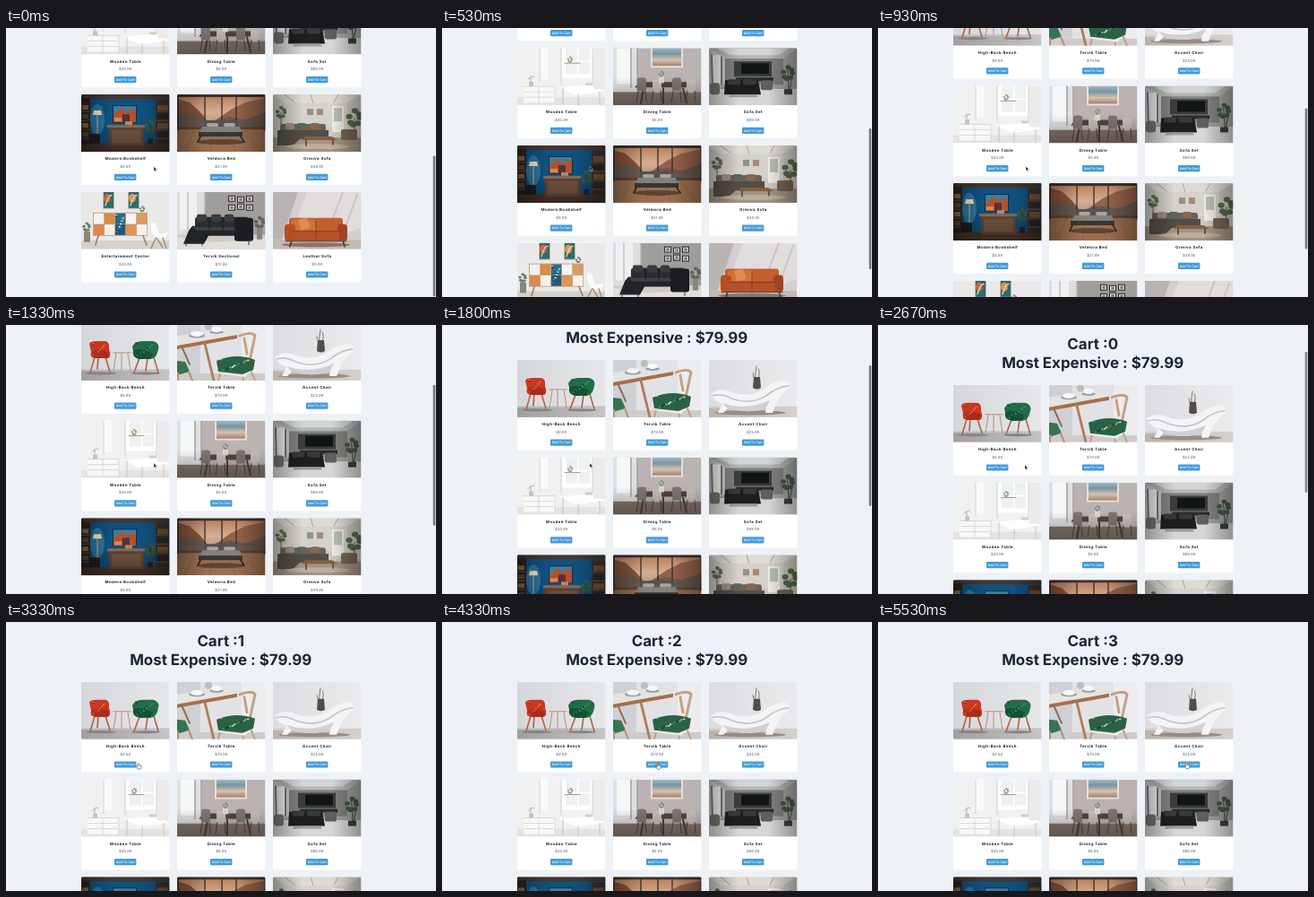
Recreate the animation shown at these times as an HTML page. Size 480x300 px, loop 5590 ms.

```html
<!DOCTYPE html>
<html lang="en">
<head>
<meta charset="utf-8">
<title>Furniture shop</title>
<style>
  html, body { margin: 0; width: 100%; height: 100%; overflow: hidden; background: #eef2f7; }
  svg { display: block; }
  text { font-family: Inter, "Noto Sans", sans-serif; text-anchor: middle; text-rendering: geometricPrecision; }
  .head { font-size: 16.9px; font-weight: 700; fill: #1a2533; }
  .name { font-size: 4.35px; font-weight: 700; letter-spacing: .42px; fill: #1a2533; }
  .price { font-size: 4.3px; fill: #5d6b7f; }
  .add { font-size: 3.7px; font-weight: 500; fill: #fff; }
</style>
</head>
<body>
<svg id="stage" width="100%" height="100%" viewBox="0 0 480 300"></svg>
<script>
const LOOP = 5590, PITCH_X = 107, PITCH_Y = 108.7;

// Shape helpers, all returning SVG markup
const r = (x, y, w, h, c, rx = 0) => `<rect x="${x}" y="${y}" width="${w}" height="${h}" rx="${rx}" fill="${c}"/>`;
const o = (x, y, rx, ry, c) => `<ellipse cx="${x}" cy="${y}" rx="${rx}" ry="${ry}" fill="${c}"/>`;
const p = (d, c) => `<path d="${d}" fill="${c}"/>`;
const l = (d, c, w = 1) => `<path d="${d}" fill="none" stroke="${c}" stroke-width="${w}" stroke-linecap="round"/>`;
const room = (wall, floor, y) => r(0, 0, 99, y, wall) + r(0, y, 99, 64 - y, floor);
const wash = id => r(0, 0, 99, 64, `url(#${id})`);
const text = (cls, x, y, s) => `<text class="${cls}" x="${x}" y="${y}">${s}</text>`;
const leaves = (x, y, size, c) => [0, 1, 2, 3, 4, 5, 6].map(i =>
  o(x + Math.cos(i * 2.4) * size, y + Math.sin(i * 2.4) * size * 1.3, size * .6, size * .5, c)).join("");
const speckle = (x, y, w, h, colors) => [...Array(14).keys()].map(i =>
  o(x + (i * .618 % 1) * w, y + (i * .39 % 1) * h, 1.3, .9, colors[i % colors.length])).join("");
const gradient = (id, dir, ...stops) => `<linearGradient id="${id}" ${dir}>${stops.map((c, i) =>
  `<stop offset="${i / (stops.length - 1)}" stop-color="${c}"/>`).join("")}</linearGradient>`;
const DOWN = 'x2="0" y2="1"', ACROSS = 'x2="1" y2="0"';

const scenes = {
  bench: () => room("#d6d7db", "#a09e9f", 53) + wash("light") + r(0, 51.5, 99, 1.5, "#bfbfc2") +
    o(22, 56, 17, 1.5, "#858284") + o(72, 56, 16, 1.5, "#858284") +
    l("M36 33H55M39 34L36 53M52 34L55 53M45 34V52", "#b98b78", 1) +
    l("M15 38L10 55M19 38L18 51M27 38L32 54", "#b0633b", 1.6) +
    p("M9 23Q10 20 17 20H27Q32 21 31 29Q34 37 30 39H15Q9 38 11 32Z", "#c93720") + p("M12 32Q22 28 31 33L30 39H15Z", "#a92b1d") +
    speckle(13, 23, 14, 13, ["#ee6b36", "#8b2a26", "#d3522c"]) +
    l("M65 39L59 55M74 39L72 53M81 38L86 55", "#b0633b", 1.6) +
    p("M57 26Q60 20 68 20H80Q88 22 86 29Q84 40 77 40H65Q56 38 58 31Z", "#226b48") + p("M58 30Q67 27 80 34L77 40H65Q57 38 58 30Z", "#18513a") +
    speckle(61, 22, 21, 15, ["#409460", "#113f35", "#2b7956"]),

  table: () => room("#e2e2e6", "#cfcbcb", 56) + r(0, 0, 26, 56, "#cfd0d5") + r(72, 0, 27, 56, "#ececef") +
    p("M0 14L53 7L67 13L65 17L0 27Z", "#e6e3e1") + p("M0 25L67 13V17L0 29Z", "#a56f4b") +
    l("M31 23L41 64", "#b07c57", 2.8) + l("M6 28L14 46", "#8f6a52", 2) +
    o(22, 14, 9, 2.5, "#8fa1aa") + o(22, 12, 7, 3, "#f6f6f5") + o(44, 10, 8, 2, "#93a7ae") + o(44, 7, 6, 3, "#f8f8f6") + o(35, 4, 4, 4, "#bdbebe") +
    l("M49 52L46 64M82 52L87 64M73 56L74 64", "#c7a17f", 2.2) +
    l("M70 14Q84 9 87 14L81 42M75 17L78 34", "#c3a182", 3) +
    p("M45 48L65 43L87 49L76 60L46 56Z", "#efebe6") + p("M44 42Q66 33 87 41L85 52L73 57L46 54Z", "#2b6145") +
    speckle(49, 40, 32, 13, ["#d7e4cf", "#3d8c55", "#123d32", "#8fb693"]) +
    p("M0 42L9 43L14 54L0 58Z", "#387254") + l("M1 56V64M13 54L17 64", "#b89478", 2.2),

  chaise: () => room("#dddde1", "#bcb2ac", 54) + wash("light") + r(0, 52, 99, 2, "#cfccca") +
    l("M52 26Q51 16 53 7M54 23Q58 14 55 10M51 23L49 15", "#746c66", .9) + p("M50 19H57L58 31Q54 34 49 31Z", "#544d4a") +
    o(46, 59, 40, 2.5, "#978b85") +
    p("M2 38Q10 31 23 35Q43 43 60 33Q74 22 84 23Q93 25 90 31Q80 38 75 49L71 59H63L64 53Q44 61 21 54L16 59H10L15 49Q4 45 2 38Z", "#f4f4f6") +
    l("M4 40Q14 37 25 43Q46 51 64 40Q76 30 89 29", "#c4c4c8", 1.6) + p("M15 48Q42 57 68 45L64 53Q44 61 21 54Z", "#cfcfd4"),

  wooden: () => room("#f1f1f2", "#e4e2e2", 55) + r(50, 0, 34, 34, "#fff") + r(54, 0, 27, 29, "#eef1f0") +
    r(25, 0, 9, 35, "#fafafa") + l("M25 0V38M49 0V40M84 0V40", "#dedddc", 1.4) + l("M68 0V29M54 15H81", "#fff", 1.5) +
    r(7, 43, 35, 18, "#f8f8f8") + l("M7 43H42V62M8 49H40M8 55H40M24 43V61", "#cfcecc", .7) +
    l("M15 40V33M12 35Q16 30 19 32", "#9d9e98", .8) + r(13, 38, 5, 5, "#c8c2b9") +
    l("M53 17H70", "#b99b7c", 1) + leaves(59, 13, 2, "#8ca392") +
    p("M46 44L82 41L98 48L66 53Z", "#fff") + l("M51 45V63M68 52V64M92 49V63", "#d3c9be", 1.2) +
    r(85, 0, 14, 46, "#eceaea") + r(76, 39, 8, 3, "#dccbb8"),

  dining: () => room("#bab3b1", "#83736a", 49) + r(0, 0, 27, 49, "#dfe0e1") + r(4, 0, 15, 40, "#f6f7f7") +
    l("M20 0V44M27 0V47", "#a9a6a5", 1.6) + r(42, 0, 36, 22, "#e6dfd8") + r(44, 0, 32, 20, "url(#sea)") +
    p("M30 38H82L88 44H24Z", "#54443c") + l("M34 45L31 62M78 45L82 61M56 45V62", "#4b3e37", 2) +
    [27, 44, 66, 82].map((x, i) => r(x, 33 + i % 2 * 2, 10, 15, ["#7d7774", "#c4bfba"][i % 2], 3) + l(`M${x + 1} 48L${x - 1} 61M${x + 9} 48L${x + 10} 60`, "#504640", 1)).join("") +
    r(51, 31, 6, 8, "#d8dad4", 1) + leaves(54, 29, 2, "#829176") + wash("fall"),

  set: () => room("#a2a2a1", "#d6d6d5", 46) + p("M0 0H99L83 12H18Z", "#b4b5b5") + p("M8 0H90L78 8H24Z", "#d3d4d4") + p("M0 0L18 11V41L0 50Z", "#c9cac9") +
    r(4, 8, 9, 32, "#f1f3f2") + l("M3 8L4 44M14 10V41", "#6f7270", 1.8) + r(18, 12, 65, 29, "#80817f") +
    r(28, 15, 42, 17, "#3b3d3d") + r(36, 17, 31, 12, "#121516") + r(30, 33, 42, 4, "#2a2c2c") +
    p("M18 36H55L58 52H17Z", "#1d1f1f") + r(21, 35, 14, 6, "#383939", 2) + r(38, 35, 15, 6, "#383939", 2) +
    p("M24 52H53L55 55H22Z", "#9b9b99") + r(58, 36, 13, 11, "#5f605e", 2) +
    l("M89 50Q89 32 87 22M90 48L94 27", "#4d584d", 1.3) + leaves(88, 28, 5, "#455846") + r(84, 46, 9, 6, "#3a3e3d") +
    r(1, 39, 11, 13, "#737370", 3) + wash("sides"),

  shelf: () => r(0, 0, 99, 64, "#10517f") + r(0, 0, 99, 5, "#46362e") + r(0, 54, 99, 10, "#4c372b") +
    r(0, 4, 10, 51, "#2b241f") + r(83, 6, 16, 49, "#3e3028") +
    [12, 22, 32, 42].map((y, i) => r(1, y, 7, 5, ["#8a6545", "#54483c"][i % 2]) + r(85, y, 12, 6, ["#6e5237", "#252a2c"][i % 2]) + l(`M0 ${y + 7}H9M83 ${y + 7}H99`, "#7d5f43", .8)).join("") +
    o(18, 28, 8, 17, "#2c74a0") + p("M14 18H22L23 23H13Z", "#f8e2b6") + l("M18 23V52", "#d8ad78", 1) +
    r(35, 12, 27, 20, "#152f42") + r(36, 13, 25, 18, "#3c7f9c") + p("M36 22L45 15L51 20L57 15L61 20V31H36Z", "#b2512f") + r(46, 22, 8, 9, "#57303a") + r(37, 26, 8, 4, "#d88a4b") +
    p("M30 36H69L71 57H32Z", "#5e4536") + r(29, 34, 42, 3, "#8c6a53") + r(34, 40, 33, 14, "#725340") + r(49, 30, 8, 4, "#b48a62") +
    leaves(77, 35, 4, "#3d5a3c") + l("M77 36V51", "#37482f", 1) + r(74, 49, 6, 6, "#22252a") +
    r(9, 44, 12, 11, "#1d2023", 2) + wash("sides") + wash("fall"),

  bed: () => r(0, 0, 99, 40, "url(#dusk)") +
    p("M0 5L14 9L25 19L32 27V36H0Z", "#89533a") + p("M44 28L60 17L76 9L99 4V36H40Z", "#93614a") +
    p("M0 24L18 21L36 30L58 25L77 28L99 20V40H0Z", "#675850") +
    r(0, 0, 99, 3, "#3a302c") + r(0, 36, 99, 28, "#9b6e4f") + r(0, 36, 99, 3, "#5a453a") +
    [0, 1, 2, 3, 4, 5].map(i => l(`M${i * 19} 39L${i * 28 - 19} 64`, "#7d583f", .6)).join("") +
    l("M1 3V40M31 3V37M50 3V37M66 3V37M98 3V40", "#302d2b", 1.3) +
    o(49, 53, 27, 3, "#5f4433") + r(30, 29, 38, 9, "#55514e", 1) + p("M28 36H70L73 44H24Z", "#86807b") + p("M24 42H73V47H24Z", "#383533") +
    r(33, 32, 13, 4, "#aaa39d", 2) + r(52, 32, 13, 4, "#aaa39d", 2) + l("M26 47L23 53M71 47L75 53", "#272625", 1.6) + wash("sides"),

  sofa: () => room("#cbc8c1", "#a39382", 48) + p("M0 0H99L81 10H13Z", "#dedbd4") + l("M13 0L24 9M42 0L45 10M73 0L68 9", "#a8a198", 1) +
    r(12, 10, 71, 27, "#d5d1cb") + r(66, 13, 13, 29, "#eeeae4") + r(68, 15, 9, 15, "#b5bdb3") +
    r(38, 16, 7, 7, "#8e9486") + r(49, 16, 7, 7, "#a18c78") +
    leaves(9, 20, 4, "#5f6f52") + leaves(91, 26, 6, "#566c47") + l("M9 20V43M91 27V46", "#566047", 1) +
    r(8, 33, 51, 13, "#6a6259", 3) + p("M5 40H62V50H30L22 57H5Z", "#544d45") +
    [14, 27, 42].map((x, i) => r(x, 32, 10, 7, ["#9b9181", "#5c675c", "#85694f"][i], 2)).join("") +
    o(50, 58, 36, 3, "#b9ae9f") + p("M36 47H66L72 51H33Z", "#82603f") + l("M37 51V57M67 51V56", "#4f3d2f", 1.5) +
    r(76, 39, 18, 12, "#776450", 2) + wash("sides"),

  center: () => room("#e9e9e9", "#d5d0cb", 54) +
    [24, 52].map((x, i) => r(x, 0, 13, 19, "#d0b49a") + r(x + 1, 0, 11, 18, "#286c73") + o(x + 5, 7, 4, 5, i ? "#d99653" : "#ca673f") + l(`M${x + 3} 15Q${x + 7} 2 ${x + 10} 4`, "#e7d2ab", 1.4)).join("") +
    r(13, 23, 61, 26, "#c7a080") +
    [0, 1, 2, 3, 4, 5, 6, 7, 8, 9].map(i => r(14 + i % 5 * 12, 24 + (i / 5 | 0) * 12.3, 11.2, 11.8, ["#f5f3ef", "#d98b48", "#286b8d", "#f6f4f0", "#dd9a60", "#d98b4d", "#f3f0ec", "#23587b", "#dd9558", "#f4f2ee"][i])).join("") +
    speckle(39, 26, 9, 19, ["#d3e0df", "#154c72", "#4e94ae"]) + l("M19 49L16 59M69 49L73 59", "#ae8561", 1.8) +
    leaves(6, 39, 3, "#6d7d66") + r(3, 44, 7, 12, "#8b847c", 1) +
    p("M77 36Q82 31 85 40L87 47L97 45Q96 53 86 52Q79 51 77 36Z", "#fafaf9") + l("M83 52L78 63M91 51L95 63M84 51L91 62", "#a1805f", 1.2) +
    leaves(68, 19, 2, "#73886c"),

  sectional: () => room("#a19d9c", "#cfcac7", 48) + r(0, 0, 31, 48, "#dddddd") + r(3, 0, 19, 42, "#f0f0f0") + l("M12 0V42M31 0V46", "#b5b3b2", 1.2) +
    [0, 1, 2, 3, 4, 5].map(i => { const x = 57 + i % 3 * 10, y = 4 + (i / 3 | 0) * 9 + i % 2; return r(x, y, 8, 7, "#2c2b2b") + r(x + 1, y + 1, 6, 5, "#cfcdca") + r(x + 2.5, y + 2, 3, 3, "#777573"); }).join("") +
    p("M0 50L40 56L99 52V64H0Z", "#e2deda") +
    r(20, 28, 60, 17, "#2b2d30", 3) + p("M17 38H64L67 49H35L30 58H7L13 43Z", "#222427") + r(64, 29, 21, 26, "#1b1d20", 3) +
    p("M17 39H63L65 43H22Z", "#3e4144") + l("M36 29V41M51 29V42M34 47L29 56", "#141618", .8) +
    r(22, 25, 11, 8, "#393b3e", 2) + r(38, 25, 11, 8, "#393b3e", 2) + r(53, 25, 10, 8, "#393b3e", 2) +
    l("M10 57V60M28 57V60M80 55V59", "#3f3934", 1) + leaves(92, 34, 4, "#5f665a") + r(89, 40, 6, 13, "#8b8580"),

  leather: () => room("#d3cfce", "#c3b9b3", 53) + p("M0 0H28L10 53H0Z", "#b9b4b4") + p("M38 0H99V40L65 53H18Z", "#e1dddc") + l("M78 0L58 53M94 3L76 53", "#cbc5c3", 2) +
    o(48, 59, 38, 2.5, "#85766f") + l("M21 54L19 61M78 54L80 61", "#463b37", 1.6) +
    r(18, 29, 60, 20, "#c45f2e", 3) + r(21, 31, 27, 13, "#d2703a", 3) + r(49, 31, 27, 13, "#c25f2f", 3) +
    r(13, 36, 12, 19, "#b34e25", 4) + r(72, 36, 11, 19, "#a04322", 4) + r(22, 43, 52, 12, "#b5512a", 2) +
    l("M23 44H74M48 32V53", "#7a3b1f", .8) + p("M28 31L38 29L42 40L31 43Z", "#e08d51") + l("M14 55H82", "#6d3826", 1)
};

const goods = [
  ["High-Back Bench", "9.99", "bench"], ["Tervik Table", "79.99", "table"], ["Accent Chair", "25.99", "chaise"],
  ["Wooden Table", "45.99", "wooden"], ["Dining Table", "6.99", "dining"], ["Sofa Set", "69.99", "set"],
  ["Modern Bookshelf", "8.99", "shelf"], ["Velmora Bed", "21.99", "bed"], ["Ormiva Sofa", "39.95", "sofa"],
  ["Entertainment Center", "29.98", "center"], ["Tervik Sectional", "10.98", "sectional"], ["Leather Sofa", "9.99", "leather"]
];

const card = ([name, price, scene], i) =>
  `<g transform="translate(${84 + i % 3 * PITCH_X} ${66.8 + (i / 3 | 0) * PITCH_Y})" clip-path="url(#round)">
    ${r(0, 0, 98.5, 101, "#fff")}
    <svg width="98.5" height="64" viewBox="0 0 98.5 64">${scenes[scene]()}</svg>
    ${text("name", 49.4, 73.2, name)}${text("price", 49.2, 81.9, "$" + price)}
    ${r(37, 88.6, 24.4, 7.2, "#429bd8", 1)}${text("add", 49.2, 93.5, "Add To Cart")}
  </g>`;

const stage = document.getElementById("stage");
stage.innerHTML = `
  <clipPath id="round"><rect width="98.5" height="101" rx="1.5"/></clipPath>
  ${gradient("light", ACROSS, "#fff0", "#fff6")}
  ${gradient("fall", DOWN, "#0000", "#0000", "#0004")}
  ${gradient("sides", ACROSS, "#0005", "#0000", "#0000", "#0005")}
  ${gradient("sea", DOWN, "#a3bac4", "#7795a2", "#d7c2b0", "#a5806a")}
  ${gradient("dusk", DOWN, "#b87a58", "#d6ae92", "#9b8a80")}
  ${r(0, 0, 480, 300, "#eef2f7")}
  <g id="page">
    ${r(226.5, -.8, 26.5, .8, "#59616b")}
    <text id="cart" class="head" x="239.7" y="27.3"></text>
    ${text("head", 239.7, 48.1, "Most Expensive : $79.99")}
    ${goods.map(card).join("")}
  </g>
  <rect id="bar" x="476.7" width="2.6" height="157" rx="1.3" fill="#75777b"/>
  <g id="pointer" stroke-linejoin="round">
    <path id="arrow" d="M0 0V5L1.2 4L2 5.8L2.8 5.4L2 3.7H3.5Z" fill="#111" stroke="#fff" stroke-width=".4"/>
    <path id="hand" d="M-.7 .6Q0 -.6 .6 .6V2.4L3.3 3V5L2.5 6.8H-.6L-2.3 4L-1.6 3.4L-.7 4.2Z" fill="#fff" stroke="#222" stroke-width=".5"/>
  </g>`;
const [page, cart, bar, pointer, arrow, hand] =
  ["page", "cart", "bar", "pointer", "arrow", "hand"].map(id => document.getElementById(id));

// Keys are [time, ...values]
const scrollKeys = [[0, 210.2], [530, 153.4], [1330, 69], [1800, 28], [2130, -.8], [2400, 0]];
const pointerKeys = [[0, 165, 154.5], [1800, 165, 154], [2130, 165, 156], [2600, 165, 156], [3070, 147.7, 157.2], [3330, 147.7, 157.2],
  [3870, 225, 163], [4200, 241, 157.5], [4470, 241, 157.5], [5070, 345.5, 163], [5130, 345, 158], [5330, 344.5, 156.6]];
const smooth = k => k * k * (3 - 2 * k);

function track(keys, t, ease = k => k) {
  const i = keys.findIndex(k => k[0] > t);
  if (i < 0) return keys[keys.length - 1].slice(1);
  const a = keys[i - 1], b = keys[i], k = ease((t - a[0]) / (b[0] - a[0]));
  return a.slice(1).map((v, n) => v + (b[n + 1] - v) * k);
}

function draw(t) {
  const [scroll] = track(scrollKeys, t);
  page.setAttribute("transform", `translate(0 ${-scroll})`);
  bar.setAttribute("y", 30 + scroll * .535);
  bar.setAttribute("opacity", Math.max(0, Math.min(1, (2900 - t) / 260)));

  const count = [3200, 4330, 5525].filter(c => t >= c).length;
  const label = "Cart :" + count;
  if (cart.textContent !== label) cart.textContent = label;

  const [x, y] = track(pointerKeys, t, smooth);
  const col = (x - 120) % PITCH_X;
  const over = t > 2400 && col >= 0 && col < 29 && y > 155 && y < 163;
  pointer.setAttribute("transform", `translate(${x} ${y})`);
  arrow.setAttribute("visibility", over ? "hidden" : "visible");
  hand.setAttribute("visibility", over ? "visible" : "hidden");
}

const start = performance.now();
function tick() {
  draw((performance.now() - start) % LOOP);
  requestAnimationFrame(tick);
}
tick();
</script>
</body>
</html>
```
